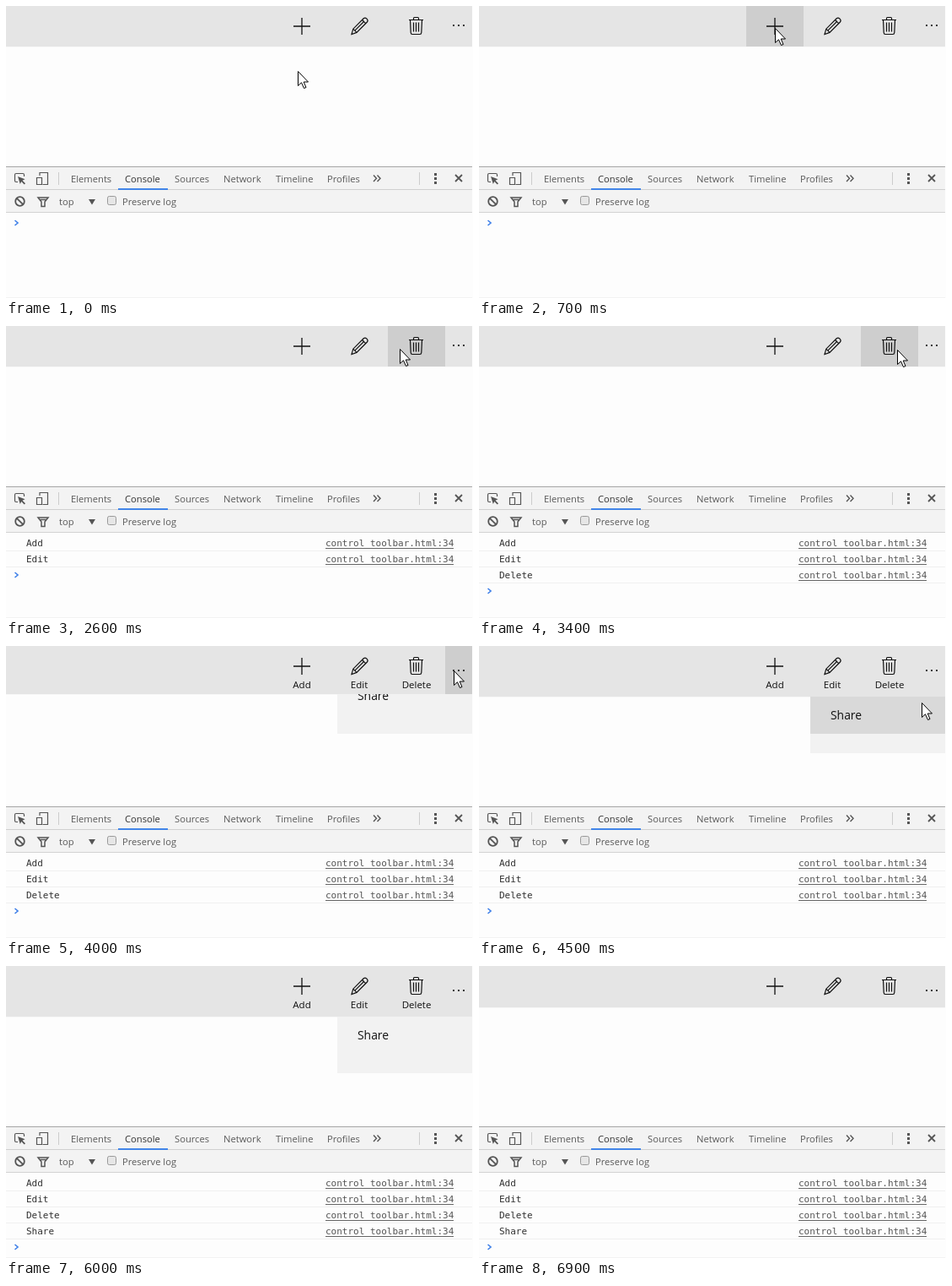
Write an HTML page with a canvas that moves like this. It is 554 px wide and 346 px high and loops after 7 s.

```html
<!DOCTYPE html>
<html lang="en">
<head>
<meta charset="utf-8">
<title>Toolbar demo</title>
<style>
  html, body { margin: 0; width: 100%; height: 100%; overflow: hidden; background: #fdfdfd; }
  canvas { display: block; }
</style>
</head>
<body>
<canvas id="stage" width="554" height="346"></canvas>
<script>
const ctx = document.getElementById('stage').getContext('2d');
const LOOP = 7000, STEP = 100;
const SANS = '"Open Sans", "Noto Sans", sans-serif';
const MONO = '"DejaVu Sans Mono", monospace';

// time, x, y of the pointer tip
const pointerPath = [
  [0, 346, 77], [200, 346, 77], [700, 351, 26], [1400, 351, 26],
  [2000, 412, 27], [2300, 412, 27], [2600, 467, 27], [2700, 469, 27],
  [3100, 469, 27], [3800, 531, 29], [4200, 531, 29], [4600, 523, 79],
  [5600, 523, 79], [5700, 516, 106]
];
const logs = [[1000, 'Add'], [2200, 'Edit'], [3000, 'Delete'], [5000, 'Share']];
const presses = [[900, 1000], [2100, 2200], [2900, 3000], [3900, 4000], [4800, 5000]];
const buttons = [317, 385, 453, 521];

function rect(x, y, w, h, color) {
  ctx.fillStyle = color;
  ctx.fillRect(x, y, w, h);
}

function text(str, x, y, size, color, family = SANS, align = 'left') {
  ctx.font = `${size}px ${family}`;
  ctx.textAlign = align;
  ctx.fillStyle = color;
  ctx.fillText(str, x, y);
}

function stroke(d, color, width = 1.2) {
  ctx.strokeStyle = color;
  ctx.lineWidth = width;
  ctx.stroke(new Path2D(d));
}

function fill(d, color) {
  ctx.fillStyle = color;
  ctx.fill(new Path2D(d));
}

function pointerAt(t) {
  const i = pointerPath.findIndex(p => p[0] > t);
  if (i < 0) return pointerPath.at(-1).slice(1);
  const [t0, x0, y0] = pointerPath[i - 1], [t1, x1, y1] = pointerPath[i];
  const k = (t - t0) / (t1 - t0);
  return [Math.round(x0 + (x1 - x0) * k), Math.round(y0 + (y1 - y0) * k)];
}

function barHeight(t) {
  if (t < 4000) return 48;
  if (t >= 6900) return 49;
  return t < 4100 ? 57 : 60;
}

function drawMenu(t, y, pressed) {
  const offset = t < 4100 ? -23 : t < 4200 ? -5 : 0;
  ctx.save();
  ctx.beginPath();
  ctx.rect(393, barHeight(t), 160, 90);
  ctx.clip();
  rect(393, 60 + offset, 160, 67, '#f2f2f2');
  if (y >= 60 && y < 104 && t < 6000) rect(393, 60, 160, 44, pressed ? '#c2c2c2' : '#d9d9d9');
  text('Share', 417, 87 + offset, 13.9, '#111');
  ctx.restore();
}

function drawToolbar(t, x, y, pressed) {
  const height = barHeight(t), open = t >= 4000 && t < 6900;
  rect(0, 0, 553, height, '#e5e5e5');
  rect(0, height, 553, 1, '#f7f7f7');
  if (open) drawMenu(t, y, pressed);
  if (y < height && t < 6000) {
    const i = buttons.findLastIndex(left => x >= left);
    if (i >= 0) rect(buttons[i], 0, i === 3 ? 32 : 68, height, pressed ? '#b7b7b7' : '#cecece');
  }
  const ink = '#111';
  stroke('M341 24H361M351 14V34', ink, 1.3);
  stroke('M410 33.5L411.8 27.2L424.2 14.8Q426 13.2 428 15.2Q430 17.2 428.4 19L416 31.4Z' +
    'M411.8 27.2L416 31.4M422.5 16.5L426.7 20.7M413.8 29.2L425 18', ink);
  stroke('M478 16.5H495M483.5 16V14.5Q483.5 13.5 484.5 13.5H488.5Q489.5 13.5 489.5 14.5V16' +
    'M479.5 16.5L480.2 31.5Q480.3 33.5 482 33.5H491Q492.7 33.5 492.8 31.5L493.5 16.5' +
    'M483.5 19.5V30.5M486.5 19.5V30.5M489.5 19.5V30.5', ink);
  for (const dot of [530, 536, 542]) rect(dot, t < 4000 ? 22 : 28, 2, 2, '#333');
  if (open) {
    [['Add', 351], ['Edit', 419], ['Delete', 487]]
      .forEach(([label, cx]) => text(label, cx, 50, 11.5, ink, SANS, 'center'));
  }
}

function drawDevtools() {
  rect(0, 190, 553, 55, '#f3f3f3');
  rect(0, 190, 553, 1, '#a6a6a6');
  rect(0, 217, 553, 1, '#cfcfcf');
  rect(0, 244, 553, 1, '#d2d2d2');
  rect(0, 345, 553, 1, '#f2f2f2');
  rect(133, 216, 59, 2, '#4285e8');
  rect(62, 197, 1, 15, '#ccc');
  rect(490, 197, 1, 15, '#ccc');

  const tabs = [['Elements', 77], ['Console', 141], ['Sources', 200],
    ['Network', 258], ['Timeline', 320], ['Profiles', 381]];
  for (const [name, x] of tabs) text(name, x, 209, 11.2, name === 'Console' ? '#333' : '#5a5a5a');
  text('top', 63, 236, 11.2, '#5a5a5a');
  text('Preserve log', 138, 236, 11.2, '#5a5a5a');

  const gray = '#555';
  stroke('M14 208.5H12Q10.5 208.5 10.5 207V200Q10.5 198.5 12 198.5H20Q21.5 198.5 21.5 200V202', gray);
  fill('M14 202L22.5 205.2L19.5 206.7L23 210.2L21.7 211.5L18.2 208L16.8 211Z', gray);
  stroke('M40 201V197.5H49.5V211.5H43.5M36.5 203.5H42.5V211.5H36.5Z', gray);
  stroke('M436 200.5L439.5 204.3L436 208M440.5 200.5L444 204.3L440.5 208', gray, 1.4);
  for (const y of [198, 203, 208]) rect(508, y, 3, 3, gray);
  stroke('M533 200L541 208M541 200L533 208', gray, 1.8);

  ctx.beginPath();
  ctx.arc(16.5, 231.5, 5.3, 0, Math.PI * 2);
  ctx.strokeStyle = gray;
  ctx.lineWidth = 1.8;
  ctx.stroke();
  stroke('M12.8 227.8L20.2 235.2', gray, 1.8);
  stroke('M38 227H50L46 232V237.5H42V232ZM39.5 229.5H48.5', gray, 1.5);
  fill('M98 229H106L102 235.5Z', gray);
  ctx.beginPath();
  ctx.roundRect(120.5, 225.5, 10, 10, 2);
  ctx.fillStyle = '#e6e6e6';
  ctx.fill();
  ctx.strokeStyle = '#999';
  ctx.lineWidth = 1;
  ctx.stroke();
}

function drawConsole(t) {
  const rows = logs.filter(([time]) => time <= t);
  rows.forEach(([, name], i) => {
    const y = 261 + i * 19;
    text(name, 24, y, 11, '#303030', MONO);
    text('control_toolbar.html:34', 379, y, 11, '#545454', MONO);
    rect(379, y + 2, 152, 1, '#656565');
    rect(0, y + 5, 553, 1, '#f0f0f0');
  });
  const y = 257 + rows.length * 19;
  stroke(`M10.5 ${y - 3}L14 ${y}L10.5 ${y + 3}`, '#3f80e8', 1.6);
}

function drawPointer(x, y) {
  ctx.save();
  ctx.translate(x + 0.5, y + 0.5);
  const arrow = 'M0 0V17L4 13.3L7 20L9.5 19L6.7 12.5H12Z';
  fill(arrow, '#fff');
  stroke(arrow, '#000', 1);
  ctx.restore();
}

function draw(now) {
  const t = Math.floor((now % LOOP) / STEP) * STEP;
  const [x, y] = pointerAt(t);
  const pressed = presses.some(([from, to]) => t >= from && t < to);
  rect(0, 0, 554, 346, '#fdfdfd');
  drawToolbar(t, x, y, pressed);
  drawDevtools();
  drawConsole(t);
  if (t < 6000) drawPointer(x, y);
}

const start = performance.now();
function tick() {
  draw(performance.now() - start);
  requestAnimationFrame(tick);
}
tick();
</script>
</body>
</html>
```
